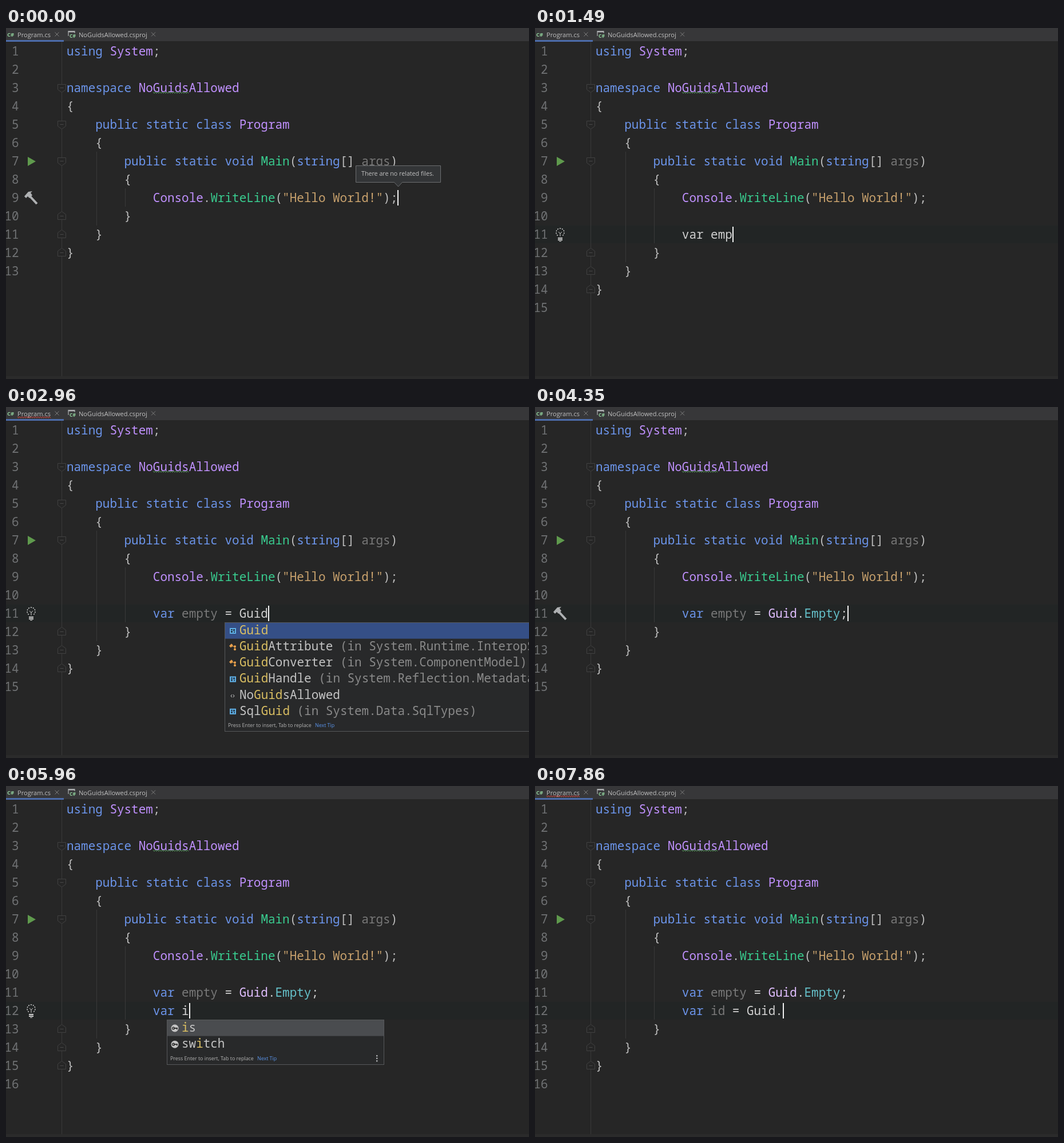
These frames come from a looping animation (914x613 px, 7.99 s). An HTML page with a canvas:

```html
<!DOCTYPE html>
<html lang="en">
<head>
<meta charset="utf-8">
<title>Code editor</title>
<style>
html, body { margin: 0; width: 100%; height: 100%; overflow: hidden; background: #262626; }
canvas { display: block; }
</style>
</head>
<body>
<canvas id="stage" width="914" height="613"></canvas>
<script>
(() => {
const ctx = document.getElementById('stage').getContext('2d');
const LOOP = 7990, CW = 12.57, LEFT = 106, LINE = 32, ROW = 28.15;
const MONO = '20.95px "Noto Sans Mono", monospace';
const UI = '"Open Sans", "Noto Sans", sans-serif';
const C = {
  bg: '#262626', text: '#bdbdbd', typed: '#d0d0d0', kw: '#6c95eb', type: '#c191ff',
  method: '#39cc8f', str: '#c9a26d', dim: '#787878', struct: '#e1bfff', field: '#66c3cc',
  match: '#d9be62', guide: '#393939', icon: '#afb1b3'
};

const words = {};
const tag = (colour, list) => list.split(' ').forEach(w => words[w] = C[colour]);
tag('kw', 'using namespace public static class void string var');
tag('type', 'System NoGuidsAllowed Program Console');
tag('method', 'Main WriteLine');
tag('dim', 'args empty id');
tag('struct', 'Guid');
tag('field', 'Empty');

const head = [
  'using System;', '', 'namespace NoGuidsAllowed', '{', '    public static class Program', '    {',
  '        public static void Main(string[] args)', '        {',
  '            Console.WriteLine("Hello World!");'
];

// Completion entries: kind|name|origin|type
const parse = s => s.trim().split('\n').map(l => {
  const [kind, name, from = '', type = ''] = l.trim().split('|');
  return { kind, name, from, type };
});
const lists = {
  word: parse(`K|var
    K|void
    K|volatile
    s|ValueTuple|(in System)
    c|ValueType|(in System)
    s|VarEnum|(in System.Runtime.InteropServices)
    s|Vector|(in System.Numerics)
    c|Version|(in System)
    c|Volatile|(in System.Threading)`),
  guid: parse(`s|Guid
    c|GuidAttribute|(in System.Runtime.InteropServices)
    c|GuidConverter|(in System.ComponentModel)
    s|GuidHandle|(in System.Reflection.Metadata)
    n|NoGuidsAllowed
    s|SqlGuid|(in System.Data.SqlTypes)
    c|GC|(in System)
    s|GCHandle|(in System.Runtime.InteropServices)
    c|Program`),
  after: parse(`k|is
    k|switch`),
  member: parse(`f|Empty||Guid
    m|NewGuid||Guid
    m|Parse||Guid
    m|ParseExact||Guid
    m|TryParse||bool
    m|TryParseExact||bool
    m|Equals||bool
    m|ReferenceEquals||bool`),
  value: parse(`p|args||string[]
    M|Main||void
    m|Equals||bool
    m|ReferenceEquals||bool
    v|empty||Guid
    K|async
    K|await
    K|bool
    K|byte
    K|char`)
};
lists.first = lists.value.filter(e => e.kind !== 'v');

const pop = (list, col, q = '') => ({ pop: { list, col, q } });
const a = (s, more) => ({ a: s, ...more });
const b = (s, more) => ({ b: s, ...more });
const shut = { pop: null };

// Each step changes the editor state from its time on
const steps = [
  [0, { tip: 1, extra: 0, a: '', b: '', litA: '', litB: '', pop: null, mark: 'hammer', at: 9, red: false }],
  [110, { tip: .45, extra: 1 }],
  [240, { tip: 0 }],
  [560, { extra: 2 }],
  [610, { mark: '' }],
  [750, a('v')],
  [856, { ...pop('word', 12, 'v'), mark: 'bulb', at: 11 }],
  [961, a('va', pop('word', 12, 'va'))],
  [1067, a('var', pop('word', 12, 'var'))],
  [1173, a('var ', shut)],
  [1279, a('var e')],
  [1384, a('var em')],
  [1490, a('var emp')],
  [1560, a('var empt')],
  [1655, a('var empty')],
  [1750, { red: true }],
  [2010, a('var empty ')],
  [2094, a('var empty =')],
  [2179, a('var empty = ', { litA: 'var empty' })],
  [2263, pop('first', 24)],
  [2432, a('var empty = G')],
  [2517, pop('guid', 24, 'G')],
  [2601, a('var empty = Gu')],
  [2686, pop('guid', 24, 'Gu')],
  [2770, a('var empty = Gui', pop('guid', 24, 'Gui'))],
  [2890, a('var empty = Guid')],
  [2960, pop('guid', 24, 'Guid')],
  [3090, a('var empty = Guid.', shut)],
  [3180, pop('member', 29)],
  [3270, a('var empty = Guid.E', pop('member', 29, 'E'))],
  [3360, a('var empty = Guid.Em', pop('member', 29, 'Em'))],
  [3450, a('var empty = Guid.Emp', pop('member', 29, 'Emp'))],
  [3540, a('var empty = Guid.Empt', pop('member', 29, 'Empt'))],
  [3720, a('var empty = Guid.Empty', shut)],
  [3790, { litA: 'var empty Guid' }],
  [3970, a('var empty = Guid.Empty;')],
  [4090, { litA: 'var empty Guid Empty' }],
  [4290, { red: false }],
  [4350, { mark: 'hammer' }],
  [4830, { extra: 3 }],
  [5140, { mark: 'bulb', at: 12 }],
  [5280, b('v')],
  [5365, pop('word', 12, 'v')],
  [5450, b('va', pop('word', 12, 'va'))],
  [5535, b('var', pop('word', 12, 'var'))],
  [5705, b('var ', { litB: 'var', pop: null })],
  [5875, b('var i')],
  [5960, pop('after', 16, 'i')],
  [6020, b('var id', shut)],
  [6080, { red: true }],
  [6330, b('var id ')],
  [6720, b('var id =', { litB: 'var id' })],
  [6800, b('var id = ')],
  [6880, pop('value', 21)],
  [7090, b('var id = G', pop('guid', 21, 'G'))],
  [7344, b('var id = Gu')],
  [7418, pop('guid', 21, 'Gu')],
  [7491, b('var id = Gui')],
  [7565, pop('guid', 21, 'Gui')],
  [7639, b('var id = Guid')],
  [7713, pop('guid', 21, 'Guid')],
  [7860, b('var id = Guid.', { pop: null, mark: '' })]
];

const stateAt = t => Object.assign({}, ...steps.filter(s => s[0] <= t).map(s => s[1]));
const lineTop = n => 25 + (n - 1) * LINE;

function rect(x, y, w, h, colour) {
  ctx.fillStyle = colour;
  ctx.fillRect(x, y, w, h);
}
function text(s, x, y, colour, font, align = 'left') {
  ctx.font = font;
  ctx.textAlign = align;
  ctx.fillStyle = colour;
  ctx.fillText(s, x, y);
}
function path(pts, { fill, stroke, w = 1, close = true }) {
  ctx.beginPath();
  pts.forEach(p => ctx.lineTo(p[0], p[1]));
  if (close) ctx.closePath();
  if (fill) { ctx.fillStyle = fill; ctx.fill(); }
  if (stroke) { ctx.strokeStyle = stroke; ctx.lineWidth = w; ctx.stroke(); }
}
function disc(x, y, r, colour) {
  ctx.fillStyle = colour;
  ctx.beginPath();
  ctx.arc(x, y, r, 0, 7);
  ctx.fill();
}
function wave(x0, x1, y, colour) {
  const pts = [];
  for (let x = x0, i = 0; x <= x1; x += 2, i++) pts.push([x, y + (i % 2 ? 1.2 : -1.2)]);
  path(pts, { stroke: colour, close: false });
}

function code(line, n, col, lit) {
  const y = lineTop(n) + 23;
  for (const m of line.matchAll(/"[^"]*"|\w+|[^\w\s"]+/g)) {
    const w = m[0];
    let colour = w[0] === '"' ? C.str : words[w] || C.text;
    if (lit !== undefined && !lit.split(' ').includes(w)) colour = C.typed;
    text(w, LEFT + (col + m.index) * CW, y, colour, MONO);
  }
}

function fold(n, up) {
  const y = lineTop(n) + 15.5, d = up ? -1 : 1, x = 97.5;
  path([[x - 7, y - 6 * d], [x + 7, y - 6 * d], [x + 7, y + 3 * d], [x, y + 8 * d], [x - 7, y + 3 * d]],
    { fill: C.bg, stroke: '#414141' });
  rect(x - 3, y - .5, 6, 1, '#484848');
}

function hammer(y) {
  path([[41, y - 3], [54, y + 11]], { stroke: C.icon, w: 4, close: false });
  path([[32, y - 2], [39, y - 10], [46, y - 11], [43, y - 8], [46, y - 4], [41, y + 1], [38, y - 2], [35, y + 1]],
    { fill: C.icon });
}

function bulb(y) {
  ctx.strokeStyle = '#d2d2d2';
  ctx.lineWidth = 1.4;
  ctx.setLineDash([2.2, 1.8]);
  ctx.beginPath();
  ctx.arc(44, y - 4, 7, 2.2, 7.2);
  ctx.stroke();
  ctx.setLineDash([]);
  path([[41, y - 5], [44, y - 2], [47, y - 5]], { stroke: '#c8c8c8', close: false });
  rect(43.5, y - 2, 1, 5, '#c8c8c8');
  rect(40, y + 5, 8, 2, '#d2d2d2');
  rect(40, y + 8, 8, 2, '#d2d2d2');
  rect(42, y + 11, 4, 1, '#d2d2d2');
}

function tabs(st) {
  const font = '11.1px ' + UI, sharp = 'bold 9.5px ' + UI;
  const cross = x => {
    path([[x - 3.5, 7.5], [x + 3.5, 14.5]], { stroke: '#7d7d7d', close: false });
    path([[x + 3.5, 7.5], [x - 3.5, 14.5]], { stroke: '#7d7d7d', close: false });
  };
  rect(0, 0, 914, 23, '#373739');
  rect(0, 21, 101, 3, '#4c6cab');
  text('C#', 2, 15, '#8fce9a', sharp);
  text('Program.cs', 20, 15.5, '#c0c0c0', font);
  cross(89);
  path([[109, 14], [109, 5.5], [120, 5.5], [120, 9]], { stroke: C.icon, w: 1.2, close: false });
  rect(109, 5, 11, 2.5, C.icon);
  text('C#', 111, 17, '#8fce9a', 'bold 8.5px ' + UI);
  text('NoGuidsAllowed.csproj', 127, 15.5, '#c0c0c0', font);
  cross(257.5);
  if (st.red) wave(20, 79, 18, '#d0453f');
}

function icon(kind, x, y) {
  const k = kind.toLowerCase();
  if (k === 's') {
    rect(x - 5, y - 5, 11, 10, '#5fb0e6');
    rect(x - 3, y - 3, 3, 2, '#26384a');
    rect(x + 1, y - 3, 3, 3, '#26384a');
    rect(x - 3, y, 3, 3, '#26384a');
    rect(x + 2, y + 1, 2, 2, '#26384a');
  } else if (k === 'c') {
    path([[x - 6, y - 2], [x - 2, y - 6], [x + 1, y - 3], [x - 3, y + 1]], { fill: '#e8a04c' });
    path([[x - 1, y - 1], [x + 4, y - 1], [x + 4, y + 4]], { stroke: '#e8a04c', close: false });
    disc(x + 4, y - 1, 2, '#e8a04c');
    disc(x + 4, y + 4, 2, '#e8a04c');
  } else if (k === 'm') {
    path([[x - 5, y - 3], [x - 1, y - 6], [x + 3, y - 3], [x + 3, y + 1], [x - 1, y + 4], [x - 5, y + 1]],
      { fill: '#b180d0' });
    path([[x - 5, y - 3], [x - 1, y - 1], [x + 3, y - 3]], { stroke: '#4b3658', close: false });
    disc(x + 4, y + 4, 2, '#b180d0');
  } else if (k === 'k') {
    disc(x, y, 6.5, '#c4c4c4');
    disc(x - 2.5, y, 2.6, '#333');
    disc(x - 2.8, y, 1, '#c4c4c4');
    rect(x, y - 1, 5, 2, '#333');
    rect(x + 3, y, 1.5, 2.5, '#333');
  } else if (k === 'p') {
    text('(a)', x, y + 3.5, '#c4c4c4', '10px ' + UI, 'center');
  } else if (k === 'n') {
    text('‹›', x, y + 4, '#c4c4c4', '13px ' + UI, 'center');
  } else {
    path([[x - 6, y - 2], [x - 1, y - 5], [x + 6, y], [x + 6, y + 3], [x + 1, y + 5], [x - 6, y + 1]],
      { fill: '#5fb0e6' });
    path([[x - 5, y - 1], [x + 1, y + 2], [x + 5, y]], { stroke: '#2b4d68', close: false });
  }
}

function popup({ list, col, q }, n) {
  const rows = lists[list].filter(e => e.name.toLowerCase().includes(q.toLowerCase()));
  const typed = rows.some(e => e.type);
  const chars = Math.max(...rows.map(e => e.name.length + 1 + e.from.length));
  const x = Math.round(LEFT + col * CW - 26), y = lineTop(n) + 31;
  const w = Math.max(typed && rows.length > 2 ? 516 : 380, 26 + chars * CW + 12);
  const h = Math.round(rows.length * ROW + 22.5);
  const firm = q && list !== 'after';
  rect(x, y, w, h, '#28292a');
  rect(x, y, w, ROW + .5, firm ? '#354f86' : '#4a4c4f');
  if (y + h > 613) rect(x + w - 10, y, 10, ROW + .5, '#5a5c5f');
  ctx.strokeStyle = '#56585a';
  ctx.lineWidth = 1;
  ctx.strokeRect(x + .5, y + .5, w - 1, h - 1);

  rows.forEach((e, i) => {
    const base = y + 21 + i * ROW, bold = /[KM]/.test(e.kind) ? 'bold ' : '';
    const at = e.name.toLowerCase().indexOf(q.toLowerCase()), end = at + q.length;
    const put = (s, c, colour, weight = bold) => text(s, x + 26 + c * CW, base, colour, weight + MONO);
    icon(e.kind, x + 14, base - 6);
    put(e.name.slice(0, at), 0, '#c4c4c4');
    put(e.name.slice(at, end), at, C.match);
    put(e.name.slice(end), end, '#c4c4c4');
    put(e.from, e.name.length + 1, '#8a8a8a', '');
    text(e.type, x + w - 11, base, '#8a8a8a', MONO, 'right');
  });

  const foot = y + h - 8, small = '8.9px ' + UI;
  text('Press Enter to insert, Tab to replace', x + 6, foot, '#b4b4b4', small);
  text('Next Tip', x + 158, foot, '#5a94ea', small);
  for (let i = 0; i < 3; i++) rect(x + w - 14, foot - 9 + i * 4.5, 2.4, 2.4, C.icon);
}

function tooltip(alpha) {
  ctx.globalAlpha = alpha;
  path([[611.5, 240.5], [759.5, 240.5], [759.5, 269.5], [692.5, 269.5], [685.5, 277], [678.5, 269.5], [611.5, 269.5]],
    { fill: '#333537', stroke: '#6c6e70' });
  text('There are no related files.', 621, 258, '#c0c0c0', '10.7px ' + UI);
  ctx.globalAlpha = 1;
}

function draw(t) {
  const st = stateAt(t), now = 9 + st.extra;
  rect(0, 0, 914, 613, C.bg);
  if (st.extra) rect(0, lineTop(now), 914, 31, '#222525');
  rect(0, 608, 914, 5, '#2b2b2b');
  rect(97, 24, 1, 584, C.guide);
  rect(158, 216, 1, lineTop(now + 2) - 216, C.guide);
  rect(208, 280, 1, lineTop(now + 1) - 281, C.guide);
  tabs(st);

  for (let n = 1; n <= now + 4; n++) text(n, 22.5, lineTop(n) + 23, '#707274', MONO, 'right');
  [3, 5, 7].forEach(n => fold(n, false));
  [1, 2, 3].forEach(i => fold(now + i, true));
  path([[38, 225], [52, 233], [38, 241]], { fill: '#5f9a4d' });
  if (st.mark === 'hammer') hammer(lineTop(st.at) + 15);
  if (st.mark === 'bulb') bulb(lineTop(st.at) + 16);

  head.forEach((line, i) => code(line, i + 1, 0));
  wave(257, 320, 113, '#55975a');
  [8, 4, 0].forEach((col, i) => code('}', now + 1 + i, col));
  code(st.a, 11, 12, st.litA);
  code(st.b, 12, 12, st.litB);

  const typed = [head[8].trim(), '', st.a, st.b][st.extra];
  rect(Math.round(LEFT + (12 + typed.length) * CW), lineTop(now) + 2, 2, 27, '#f0f0f0');
  if (st.pop) popup(st.pop, now);
  if (st.tip) tooltip(st.tip);
}

const start = performance.now();
function tick() {
  draw((performance.now() - start) % LOOP);
  requestAnimationFrame(tick);
}
tick();
})();
</script>
</body>
</html>
```
